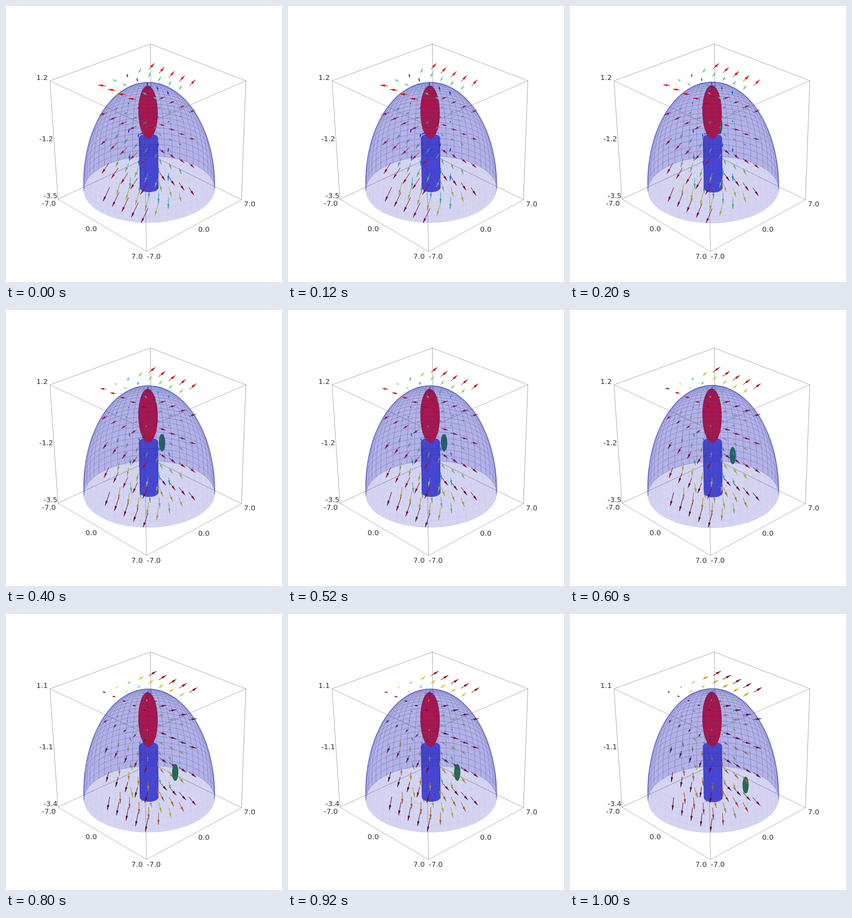
An HTML page with a canvas that plays this animation: 500 px wide and 500 px high, repeating every 1.2 s.

```html
<!DOCTYPE html>
<html>
<head>
<meta charset="utf-8">
<style>
html, body { margin: 0; height: 100%; overflow: hidden; background: #fff; }
canvas { display: block; }
</style>
</head>
<body>
<canvas id="stage" width="500" height="500"></canvas>
<script>
const g = document.getElementById('stage').getContext('2d');
const { PI, sin, cos, sqrt, abs, min, max, hypot, asin } = Math;

// Camera: distance, elevation, azimuth offset, roll and focal scale
const DIST = 14.3, SE = 0.466, CE = 0.885, TURN = -0.037, ROLL = 0.0155, FOCAL = 1735;
let step = 0, low = 0, half = 1;

// World point to camera-aligned box coordinates: right, forward, up
function view(x, y, z) {
  const u = (x + y) / 7 / Math.SQRT2, v = (x - y) / 7 / Math.SQRT2;
  return [u + v * TURN, v - u * TURN, (z - low) / half - 1];
}

function project([r, f, z]) {
  const s = FOCAL / (DIST - f * CE - z * SE);
  const a = r * s, b = (z * CE - f * SE) * s;
  return [258.2 + a - ROLL * b, 246.5 - b - ROLL * a];
}

function curve(point, from, to, n = 48, path = new Path2D()) {
  for (let i = 0; i <= n; i++) path.lineTo(...project(point(from + (to - from) * i / n)));
  return path;
}

function edges(list, color) {
  g.strokeStyle = color;
  g.lineWidth = 0.8;
  for (const [a, b] of list) {
    g.beginPath();
    g.moveTo(...project(a));
    g.lineTo(...project(b));
    g.stroke();
  }
}

// Ellipsoid of revolution with its outline and mesh
function makeBall(x, y, z, radius, height) {
  const c = view(x, y, z), R = radius / 7, H = height / half;
  const place = ([r, f, up]) => [c[0] + r * R, c[1] + f * R, c[2] + up * H];
  const cf = (DIST * CE - c[1]) / R, cz = (DIST * SE - c[2]) / H;
  const len = hypot(cf, cz), q = sqrt(1 - 1 / len ** 2);
  const rim = t => place([q * cos(t), cf / len ** 2 - q * sin(t) * cz / len,
    cz / len ** 2 + q * sin(t) * cf / len]);
  const base = t => place([cos(t), sin(t), 0]);

  function mesh(cols, rows, bottom) {
    const front = new Path2D(), back = new Path2D();
    const at = (lon, lat) => [cos(lat) * cos(lon), cos(lat) * sin(lon), sin(lat)];
    const line = (a, b) => {
      const path = a[1] * cf + a[2] * cz > 1 ? front : back;
      path.moveTo(...project(place(a)));
      path.lineTo(...project(place(b)));
    };
    const dLon = 2 * PI / cols, dLat = (PI / 2 - bottom) / rows;
    for (let i = 0; i < cols; i++) for (let j = 0; j < rows; j++) {
      const lon = i * dLon, lat = bottom + j * dLat, p = at(lon, lat);
      line(p, at(lon + dLon, lat));
      line(p, at(lon, lat + dLat));
    }
    return { front, back };
  }
  return { rim, base, mesh, cf, cut: asin(-cz / (len * q * cf)) };
}

function solidBall(x, y, z, radius, color) {
  const ball = makeBall(x, y, z, radius, radius);
  g.fillStyle = color;
  g.fill(curve(ball.rim, 0, 2 * PI));
  g.strokeStyle = 'rgba(0,0,30,.13)';
  g.lineWidth = 0.6;
  if (radius === 1) g.stroke(ball.mesh(28, 20, -PI / 2).front);
}

function cylinder() {
  const ring = z => t => view(cos(t), sin(t), z);
  const body = new Path2D();
  // front half of the wall faces the direction (1, -1)
  curve(ring(-3), -3 * PI / 4, PI / 4, 32, body);
  curve(ring(-1), PI / 4, 5 * PI / 4, 32, body);
  g.fillStyle = 'rgb(78,78,222)';
  g.fill(body);
  g.strokeStyle = 'rgba(10,10,110,.16)';
  g.lineWidth = 0.7;
  for (let z = -3; z <= -1; z += 0.1) g.stroke(curve(ring(z), -3 * PI / 4, PI / 4, 24));
  for (let t = -3 * PI / 4; t <= PI / 4; t += PI / 16)
    g.stroke(curve(z => view(cos(t), sin(t), z), -3, -1, 1));
}

function jet(q) {
  const part = m => 205 * max(0, min(1, 1.5 - abs(4 * min(q, 1) - m)));
  return `rgb(${part(3)},${part(2)},${part(1)})`;
}

function arrow([x, y, z]) {
  const k = step / 5;
  const vy = (0.305 - 0.065 * k) * y - 0.1 + 0.55 * k;
  const vz = (0.15 - 0.015 * k) * z - 0.09 * k;
  const [ax, ay] = project(view(x, y, z));
  const [bx, by] = project(view(x, y + vy, z + vz));
  const len = hypot(bx - ax, by - ay) || 1;
  const ux = (bx - ax) / len, uy = (by - ay) / len;
  const head = min(9, max(2.4, len * 0.65)), w = min(2, 1 + len * 0.07);
  const hx = bx - ux * head, hy = by - uy * head;
  g.strokeStyle = g.fillStyle = jet(hypot(0.28 * y, 0.14 * z, 0.1 + 0.09 * step));
  g.lineWidth = 1;
  g.beginPath();
  g.moveTo(ax, ay);
  g.lineTo(bx, by);
  g.stroke();
  g.beginPath();
  g.moveTo(bx, by);
  g.lineTo(hx - uy * w, hy + ux * w);
  g.lineTo(hx + uy * w, hy - ux * w);
  g.fill();
}

function dome() {
  const d = makeBall(0, 0, -3, 7, 4), s = asin(1 / d.cf);
  const hull = curve(d.rim, d.cut, PI - d.cut, 64);
  curve(d.base, PI - s, s, 48, hull);
  hull.closePath();
  const far = new Path2D(hull);
  far.addPath(curve(d.base, 0, 2 * PI, 64));
  const { front, back } = d.mesh(48, 24, 0);
  g.fillStyle = 'rgba(60,60,190,.22)';
  g.fill(far, 'evenodd');
  g.lineWidth = 0.7;
  g.strokeStyle = 'rgba(40,40,130,.36)';
  g.stroke(back);
  g.fill(hull);
  g.strokeStyle = 'rgba(60,60,190,.08)';
  g.stroke(front);
  g.strokeStyle = 'rgba(60,60,180,.6)';
  g.lineWidth = 1.2;
  g.stroke(curve(d.rim, d.cut, PI - d.cut, 64));
}

const grid = [];
for (let z = -3; z <= 1; z++)
  for (let x = -3; x <= 3; x += 1.5)
    for (let y = -3; y <= 3; y += 1.5) grid.push([x, y, z]);
const outside = ([x, y, z]) => (x * x + y * y) / 49 + (z + 3) ** 2 / 16 > 1;
const layer = p => p[0] <= p[1] ? 0 : outside(p) ? 2 : 1;
const arrows = n => grid.filter(p => layer(p) === n).forEach(arrow);

function labels() {
  const late = step > 3;
  g.font = '13px "DejaVu Sans", sans-serif';
  g.fillStyle = '#333';
  const items = [
    [late ? '1.1' : '1.2', 55, 134], [late ? '-1.1' : '-1.2', 60, 245],
    [late ? '-3.4' : '-3.5', 68, 348], ['-7.0', 65, 362], ['0.0', 144, 408],
    ['7.0', 227, 458], ['-7.0', 255, 458], ['0.0', 348, 409], ['7.0', 431, 363]
  ];
  for (const item of items) g.fillText(...item);
}

function draw() {
  const top = 1.195 - 0.015 * step;
  low = -3.51 + 0.02 * step;
  half = (top - low) / 2;
  g.fillStyle = '#fff';
  g.fillRect(0, 0, 500, 500);

  const corner = (x, y, z) => view(7 * x, 7 * y, z);
  const frame = (x, y) => [
    [corner(x, y, low), corner(x, y, top)],
    [corner(x, y, low), corner(-x, y, low)], [corner(x, y, low), corner(x, -y, low)],
    [corner(x, y, top), corner(-x, y, top)], [corner(x, y, top), corner(x, -y, top)]
  ];
  edges(frame(-1, 1), '#999');
  edges([[corner(-1, -1, low), corner(-1, -1, top)], [corner(1, 1, low), corner(1, 1, top)]], '#999');

  arrows(0);
  solidBall(0, 0.98 * step, -0.63 * step, 0.34, 'rgb(28,121,43)');
  cylinder();
  solidBall(0, 0, 0, 1, 'rgb(250,0,0)');
  arrows(1);
  dome();
  arrows(2);
  edges(frame(1, -1), 'rgba(70,70,70,.5)');
  labels();
}

function tick(now) {
  step = Math.floor(now / 200) % 6;
  draw();
  requestAnimationFrame(tick);
}
tick(0);
</script>
</body>
</html>
```
